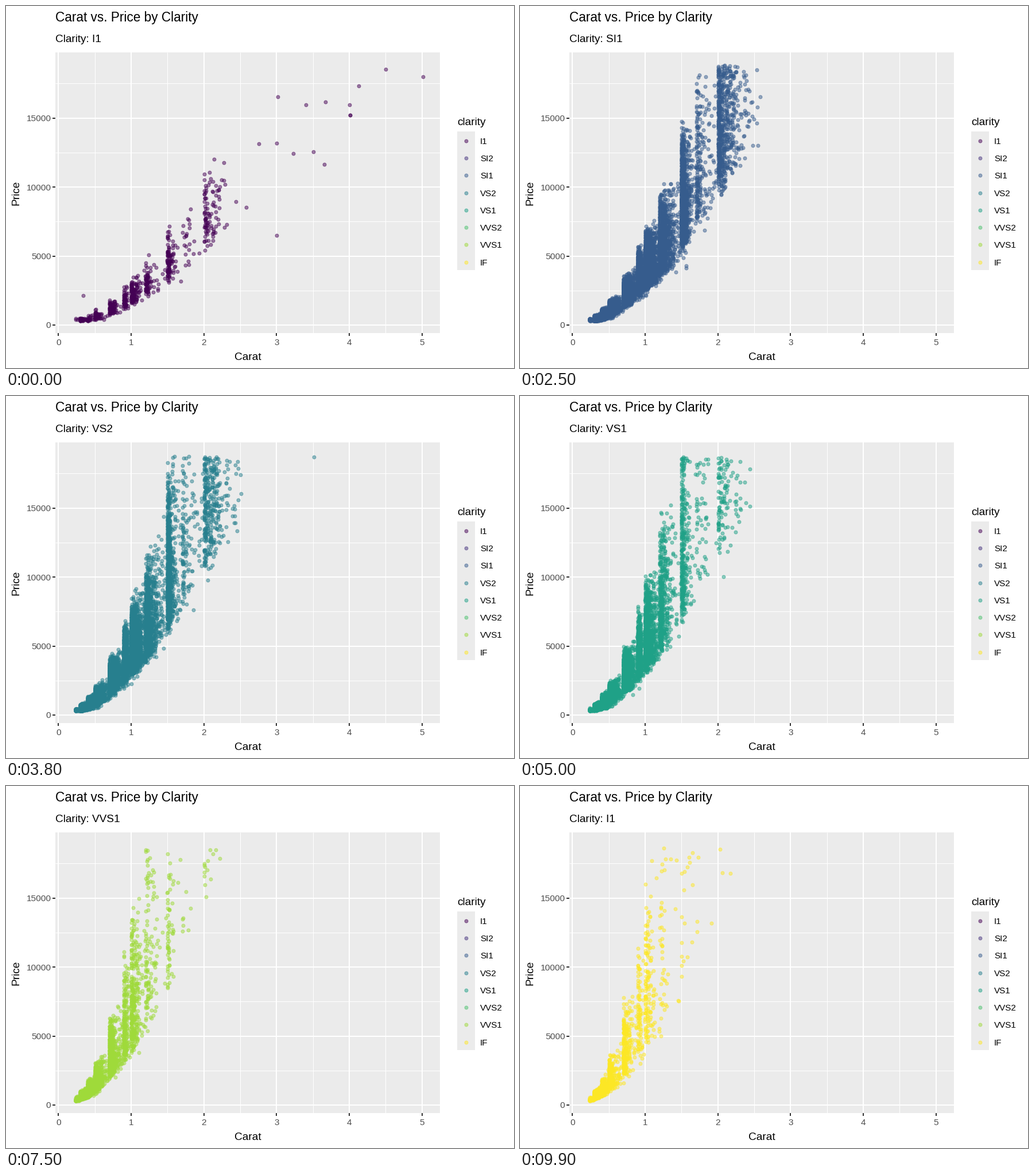
These frames come from a looping animation (885 by 632 pixels, 10 s). A matplotlib script:

```python
import numpy as np
import matplotlib.pyplot as plt
from matplotlib.animation import FuncAnimation
from matplotlib.patches import Rectangle
from matplotlib.path import Path

W, H, DPI = 885, 632, 100
PX = 72 / DPI
LEFT, RIGHT, TOP, BOTTOM = 86, 756, 81, 571
PANEL, TICK_TEXT, TICK = "#EBEBEB", "#4D4D4D", "#333333"
PRICE_CAP, PRICE_MIN = 18823, 335

LEVELS = ["I1", "SI2", "SI1", "VS2", "VS1", "VVS2", "VVS1", "IF"]
COLORS = ["#440154", "#46337E", "#365C8D", "#277F8E",
          "#1FA187", "#4AC16D", "#9FDA3A", "#FDE725"]
STONES = [690, 9194, 13065, 12258, 8171, 5066, 3655, 1790]

# Stones pile up just above popular weights.
STARTS = np.array([.23, .3, .4, .5, .7, .9, 1, 1.2, 1.5, 1.7, 2])
POPULARITY = np.array([150, 2200, 900, 1500, 2000, 1000, 2100, 1000, 900, 180, 500])

# Stones that stand far from their cloud.
LONERS = {
    "I1": [(5.01, 18018), (4.5, 18531), (4.13, 17329), (3.67, 16193),
           (4, 15984), (4.01, 15223), (4.01, 15223), (3.01, 16538),
           (3.4, 15964), (2.75, 13156), (3, 13203), (3.23, 12450),
           (3.5, 12587), (3.65, 11668), (3, 6512), (.34, 2160)],
    "SI2": [(3.01, 18700), (3.01, 18240), (3, 16970), (3.04, 15350),
            (3.01, 14230), (1.01, 9990), (.61, 3800)],
    "VS2": [(3.51, 18700)],
}


def to_x(carat):
    return 91.4 + 126.62 * np.asarray(carat)


def to_y(price):
    return 557 - 0.0241 * np.asarray(price)


def make_stones(rank, rng):
    """Carats and prices of one level; better clarity is smaller and dearer."""
    weights = POPULARITY * np.exp((1.2 - .5 * rank) * STARTS)
    counts = np.round(STONES[rank] * weights / weights.sum()).astype(int)
    start = np.repeat(STARTS, counts)
    spread = np.where(start == .9, .03, .045 + .03 * start ** 2 * (start != 1.5))
    carat = start + rng.gamma(.7, spread)
    carat = np.floor(carat * 100 + 1e-6) / 100

    size = np.sqrt(start * carat)
    discount_low, discount_high = (.68, .76) if rank == 0 else (1, 1)
    low = discount_low * 2500 * 1.1 ** (rank - 1) * size ** 1.85
    high = discount_high * 5500 * 1.2 ** (rank - 1) * size ** (1.72 + .08 * rank)
    high = np.minimum(high, 1.1 * PRICE_CAP)
    price = low * (high / low) ** rng.beta(1.5, 1.75, carat.size)
    price *= np.exp(rng.normal(0, .05, carat.size))
    price = PRICE_CAP - np.abs(PRICE_CAP - price)
    price = PRICE_MIN + np.abs(price - PRICE_MIN)

    keep = carat <= 2.8 - .09 * rank
    loners = np.array(LONERS.get(LEVELS[rank], [])).reshape(-1, 2)
    return np.r_[carat[keep], loners[:, 0]], np.r_[price[keep], loners[:, 1]]


plt.rcParams["font.family"] = "Liberation Sans"
fig = plt.figure(figsize=(W / DPI, H / DPI), dpi=DPI, facecolor="white")
ax = fig.add_axes([0, 0, 1, 1])
ax.set_xlim(0, W)
ax.set_ylim(H, 0)
ax.axis("off")

# A circle moved by half a pixel, so that it sits on a pixel's centre.
circle = Path.unit_circle()
DOT = Path(circle.vertices + np.array([1, -1]) / 6, circle.codes)


def text(x, y, label, size, color="black", va="baseline", **kwargs):
    return ax.text(x, y, label, fontsize=size * PX, color=color, va=va, **kwargs)


def line(xs, ys, color, width, z):
    ax.plot(xs, ys, color=color, lw=width * PX, solid_capstyle="butt", zorder=z)


def dots(xs, ys, color):
    return ax.plot(np.round(xs), np.round(ys), ls="", marker=DOT, color=color,
                   alpha=.5, ms=7 * PX, mew=PX, zorder=4)[0]


def box(left, top, width, height):
    ax.add_patch(Rectangle((left, top), width, height, fc=PANEL, lw=0))


box(LEFT, TOP, RIGHT - LEFT, BOTTOM - TOP)

for i in range(11):
    x, major = to_x(i / 2), i % 2 == 0
    line([x, x], [TOP, BOTTOM], "white", 1 + major, 2 + major)
    if major:
        line([x, x], [BOTTOM, BOTTOM + 5], TICK, 2, 3)
        text(x, 592.5, str(i // 2), 15.4, TICK_TEXT, ha="center")

for i in range(8):
    y, major = to_y(2500 * i), i % 2 == 0
    line([LEFT, RIGHT], [y, y], "white", 1 + major, 2 + major)
    if major:
        line([LEFT - 5, LEFT], [y, y], TICK, 2, 3)
        text(78.5, y + 5.5, str(2500 * i), 15.4, TICK_TEXT, ha="right")

text(86, 27, "Carat vs. Price by Clarity", 22.6)
subtitle = text(86, 63, "", 19)
text(421.5, 617.5, "Carat", 19.2, ha="center")
text(26, 326.5, "Price", 19.2, ha="right", va="center", rotation=90)

text(786, 208, "clarity", 19.2)
box(786, 219, 30.5, 242.3)
for i, (level, color) in enumerate(zip(LEVELS, COLORS)):
    y = 234.8 + 30.26 * i
    dots([801], [y], color)
    text(826, y + 6, level, 15.2)

rng = np.random.default_rng(7)
clouds = []
for rank, color in enumerate(COLORS):
    carat, price = make_stones(rank, rng)
    clouds.append(dots(to_x(carat), to_y(price), color))


def level_at(frame, first):
    """Each level lasts 12.5 frames; the first change comes at `first`."""
    return int(np.floor((frame - first) / 12.5) + 1) % len(LEVELS)


def update(frame):
    subtitle.set_text("Clarity: " + LEVELS[level_at(frame, 9)])
    shown = level_at(frame, 11.9)
    for i, cloud in enumerate(clouds):
        cloud.set_visible(i == shown)
    return [subtitle, *clouds]


animation = FuncAnimation(fig, update, frames=100, interval=100,
                          repeat=True, repeat_delay=0, blit=False)
plt.show()
```
